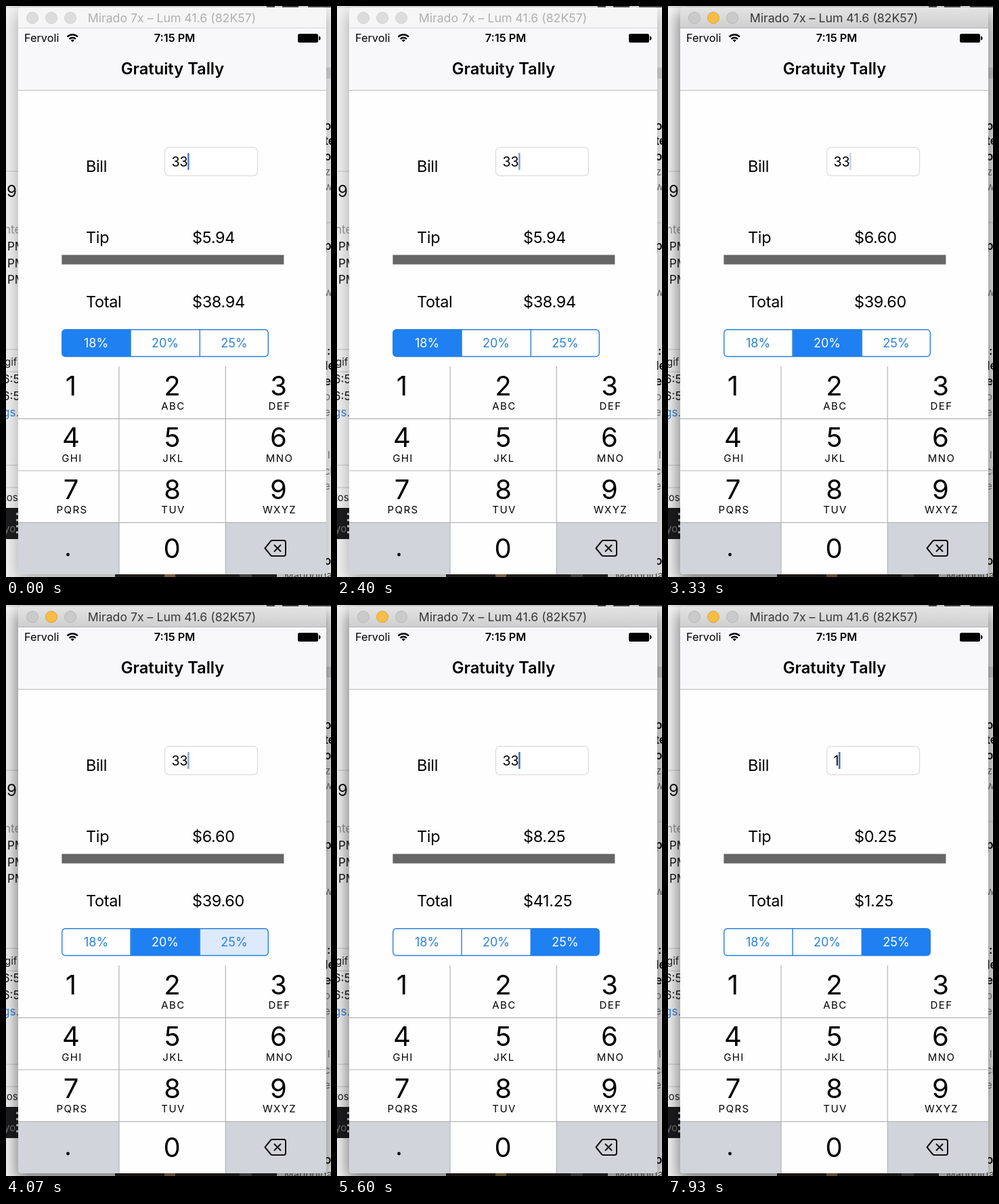
Write an HTML page that moves like this. It is 480 px wide and 843 px high and loops after 8000 ms.

```html
<!DOCTYPE html>
<html lang="en">
<head>
<meta charset="utf-8">
<title>Gratuity Tally</title>
<style>
html, body { margin: 0; width: 100%; height: 100%; overflow: hidden; background: #f4f4f4; }
svg { display: block; width: 100%; height: 100%; font-family: Inter, "Liberation Sans", sans-serif; }
.mid { text-anchor: middle; }
.label { font-size: 23.4px; letter-spacing: -.3px; }
.seg { font-size: 18px; }
.digit { font-size: 40px; }
.abc { font-size: 15px; letter-spacing: 1.4px; }
.grid { stroke: #b4b5b9; stroke-width: 1.2; }
#shadow { filter: blur(12px); }
</style>
</head>
<body>
<svg viewBox="0 0 480 843">
  <defs>
    <linearGradient id="chrome" x2="0" y2="1">
      <stop stop-color="#e5e4e5"/><stop offset="1" stop-color="#cfcecf"/>
    </linearGradient>
  </defs>

  <!-- desktop behind the window -->
  <rect width="480" height="843" fill="#f5f5f5"/>
  <rect width="480" height="3" fill="#e2e2e2"/>
  <path d="M385 0h12v2h-12zM408 0h24v2h-24zM446 0h34v2h-34z" fill="#444"/>
  <rect x="473" y="91" width="7" height="16" fill="#d8d8d8"/>
  <path d="M0 244H18M0 507H18M0 540H18M0 678H18M0 711H18M473 320H480" stroke="#c4c4c4"/>
  <rect y="741" width="18" height="46" fill="#1d1d1f"/>
  <path d="M15 750h3M15 759h3M15 768h3M15 777h3" stroke="#ddd" stroke-width="3"/>
  <rect x="161" y="838" width="239" height="5" fill="#2a2422"/>
  <rect x="234" y="838" width="16" height="5" fill="#a3744c"/>
  <rect x="345" y="838" width="18" height="5" fill="#5a5350"/>
  <g id="scraps" font-size="17"></g>
  <text x="411" y="846" font-size="15" fill="#555">Marigolda</text>

  <!-- window -->
  <rect id="shadow" x="15" y="9" width="461" height="840" rx="6"/>
  <rect x="18" y="2" width="455" height="837" rx="5" fill="#fefefe"/>
  <path id="bar" d="M18 33V7q0-5 5-5h445q5 0 5 5v26z"/>
  <path id="rule" d="M18 32.5H473"/>
  <g id="lights" stroke-width="1">
    <circle cx="39" cy="17.5" r="8.5"/><circle cx="67" cy="17.5" r="8.5"/><circle cx="95" cy="17.5" r="8.5"/>
  </g>
  <text id="title" class="mid" x="245" y="24" font-size="17.7">Mirado 7x – Lum 41.6 (82K57)</text>

  <rect x="18" y="33" width="455" height="91" fill="#f8f7f9"/>
  <path d="M18 124.5H473" stroke="#bcbcc0"/>
  <text x="27" y="53" font-size="16.3">Fervoli</text>
  <g fill="none" stroke="#000" stroke-width="2.3">
    <path d="M90.5 45.5a10.8 10.8 0 0 1 15.4 0M93.5 48.7a6.6 6.6 0 0 1 9.4 0"/>
    <path d="M95.6 50.6a3.8 3.8 0 0 1 5.2 0l-2.6 2.7z" fill="#000" stroke="none"/>
  </g>
  <text class="mid" x="249" y="53" font-size="16.3" font-weight="600">7:15 PM</text>
  <rect x="431" y="41" width="30" height="13" rx="2.5"/>
  <path d="M462 44.5q2.5 0 2.5 3t-2.5 3z"/>
  <text class="mid" x="246" y="101" font-size="23.7" font-weight="600">Gratuity Tally</text>

  <!-- form -->
  <g class="label">
    <text x="118" y="245">Bill</text>
    <text x="118" y="350">Tip</text>
    <text x="118" y="445">Total</text>
    <text id="tip" x="275" y="350"></text>
    <text id="total" x="275" y="445"></text>
  </g>
  <rect x="234.5" y="208.7" width="137" height="42" rx="6.5" fill="#fff" stroke="#dcdce0" stroke-width="1.3"/>
  <text id="bill" x="244.5" y="237" font-size="19.5"></text>
  <rect id="caret" y="217" width="2.6" height="25" fill="#3f6fc4"/>
  <rect x="82.4" y="367.5" width="328" height="14" fill="#666"/>
  <g id="segments"></g>
  <rect x="82.7" y="477.7" width="304.6" height="39.8" rx="5" fill="none" stroke="#2a80dc" stroke-width="1.4"/>
  <path d="M184 478v39M286.3 478v39" stroke="#2a80dc" stroke-width="1.4"/>

  <!-- keypad -->
  <path d="M18 763H167V839H23q-5 0-5-5zM324 763H473V834q0 5-5 5H324z" fill="#d1d4da"/>
  <path class="grid" d="M18 609.3H473M18 686H473M18 762.7H473M167 532V839M324.3 532V839"/>
  <g id="keys" class="mid"></g>
  <circle cx="91.5" cy="810" r="2.4"/>
  <g fill="none" stroke="#111" stroke-width="2" stroke-linejoin="round" stroke-linecap="round">
    <path d="M382.5 800.5l8.5-10.5q1-1 2.5-1H410q3 0 3 3v17q0 3-3 3h-16.5q-1.5 0-2.5-1z"/>
    <path d="M396.5 796l9 9M405.5 796l-9 9"/>
  </g>
</svg>
<script>
const $ = id => document.getElementById(id);
const rates = [18, 20, 25], blue = '#1f80f2';

// clipped desktop text: x, baseline, text, colour, size, weight
const ink = '#111', gray = '#777';
$('scraps').innerHTML = [
  [1, 282, '9', ink, 24], [-3, 336, 'nte', '#999'],
  [2, 361, 'PM', ink], [2, 386, 'PM', ink], [2, 410, 'PM', ink],
  [-2, 531, 'gif', '#222', 15], [-5, 557, '6:5', ink], [-5, 582, '6:5', ink],
  [-5, 606, 'gs.', '#3b82d8'], [-4, 731, 'tos', '#222', 15], [-3, 777, 'yo', gray, 15],
  [470, 183, 'o', ink, 17, 600], [470, 205, 'te', ink, 17, 600], [470, 228, 'oc', ink, 17, 600],
  [471, 250, 'zz', gray, 15], [470, 272, 'w', gray, 15], [470, 360, 'p', ink, 17, 600],
  [470, 428, 'w', gray, 15], [474, 515, ':', ink, 17, 600], [471, 537, 'le', ink, 17, 600],
  [470, 560, 'ev', ink, 17, 600], [470, 582, 'od', gray, 15], [470, 605, 'e', gray, 15],
  [475, 668, 'l', gray, 15], [470, 692, 'ck', gray, 15], [470, 714, 'e', gray, 15],
  [470, 825, 'o', ink, 17, 600]
].map(([x, y, s, c, size = 17, weight = 400]) =>
  `<text x="${x}" y="${y}" fill="${c}" font-size="${size}" font-weight="${weight}">${s}</text>`).join('');

$('segments').innerHTML = rates.map((r, i) => {
  const x = 82.7 + i * 101.6, w = 101.6, l = i ? 0 : 5, e = i > 1 ? 5 : 0;
  return `<path d="M${x + l} 477.7h${w - l - e}q${e} 0 ${e} ${e}v${39.8 - 2 * e}q0 ${e} ${-e} ${e}
    h${l + e - w}q${-l} 0 ${-l} ${-l}v${2 * l - 39.8}q0 ${-l} ${l} ${-l}z"/>
    <text class="seg mid" x="${133 + i * 102}" y="504">${r}%</text>`;
}).join('');

const letters = ['', 'ABC', 'DEF', 'GHI', 'JKL', 'MNO', 'PQRS', 'TUV', 'WXYZ'];
$('keys').innerHTML = letters.map((s, i) => {
  const x = [96, 245.5, 402.5][i % 3], y = 574.5 + 76.7 * (i / 3 | 0);
  return `<text class="digit" x="${x}" y="${y}">${i + 1}</text>
    <text class="abc" x="${x + 1.5}" y="${y + 21.5}">${s}</text>`;
}).join('') + '<text class="digit" x="245" y="815">0</text>';

// start ms, bill, selected segment, pressed segment, window active, caret blink start
const steps = [
  [0, '33', 0, -1, false, -530],
  [2900, '33', 0, 1, true, -530],
  [3200, '33', 1, -1, true, -530],
  [3930, '33', 1, 2, true, -530],
  [4200, '33', 2, -1, true, -530],
  [6200, '3', 2, -1, true, 6200],
  [6470, '', 2, -1, true, 6470],
  [7730, '1', 2, -1, true, 7730]
];
let shown;

function show([, bill, selected, pressed, active]) {
  const tip = bill * rates[selected] / 100;
  $('bill').textContent = bill;
  $('tip').textContent = '$' + tip.toFixed(2);
  $('total').textContent = '$' + (+bill + tip).toFixed(2);
  const width = bill ? $('bill').getComputedTextLength() : 0;
  $('caret').setAttribute('x', 244.5 + Math.max(0, width - .5));

  rates.forEach((_, i) => {
    const [box, text] = [...$('segments').children].slice(i * 2);
    box.setAttribute('fill', i === selected ? blue : i === pressed ? '#dceafb' : '#fefefe');
    text.setAttribute('fill', i === selected ? '#fff' : '#2a80dc');
  });

  $('bar').setAttribute('fill', active ? 'url(#chrome)' : '#f6f6f6');
  $('rule').setAttribute('stroke', active ? '#b2b1b2' : '#d8d8d8');
  $('title').setAttribute('fill', active ? '#383838' : '#b0b0b0');
  $('shadow').setAttribute('opacity', active ? .5 : .28);
  [...$('lights').children].forEach((c, i) => {
    const on = active && i === 1;
    c.setAttribute('fill', on ? '#f7bd45' : active ? '#cbcacb' : '#dddddd');
    c.setAttribute('stroke', on ? '#dfa33a' : active ? '#b8b7b8' : '#d0d0d0');
  });
}

function caretAlpha(p) {
  if (p < 500) return 1;
  return Math.max(0, 1 - (p - 500) / 250, (p - 800) / 200);
}

function frame() {
  const t = performance.now() % 8000;
  const step = steps.findLast(s => s[0] <= t);
  if (step !== shown) show(shown = step);
  $('caret').setAttribute('opacity', caretAlpha((t - step[5]) % 1000));
  requestAnimationFrame(frame);
}
frame();
</script>
</body>
</html>
```
